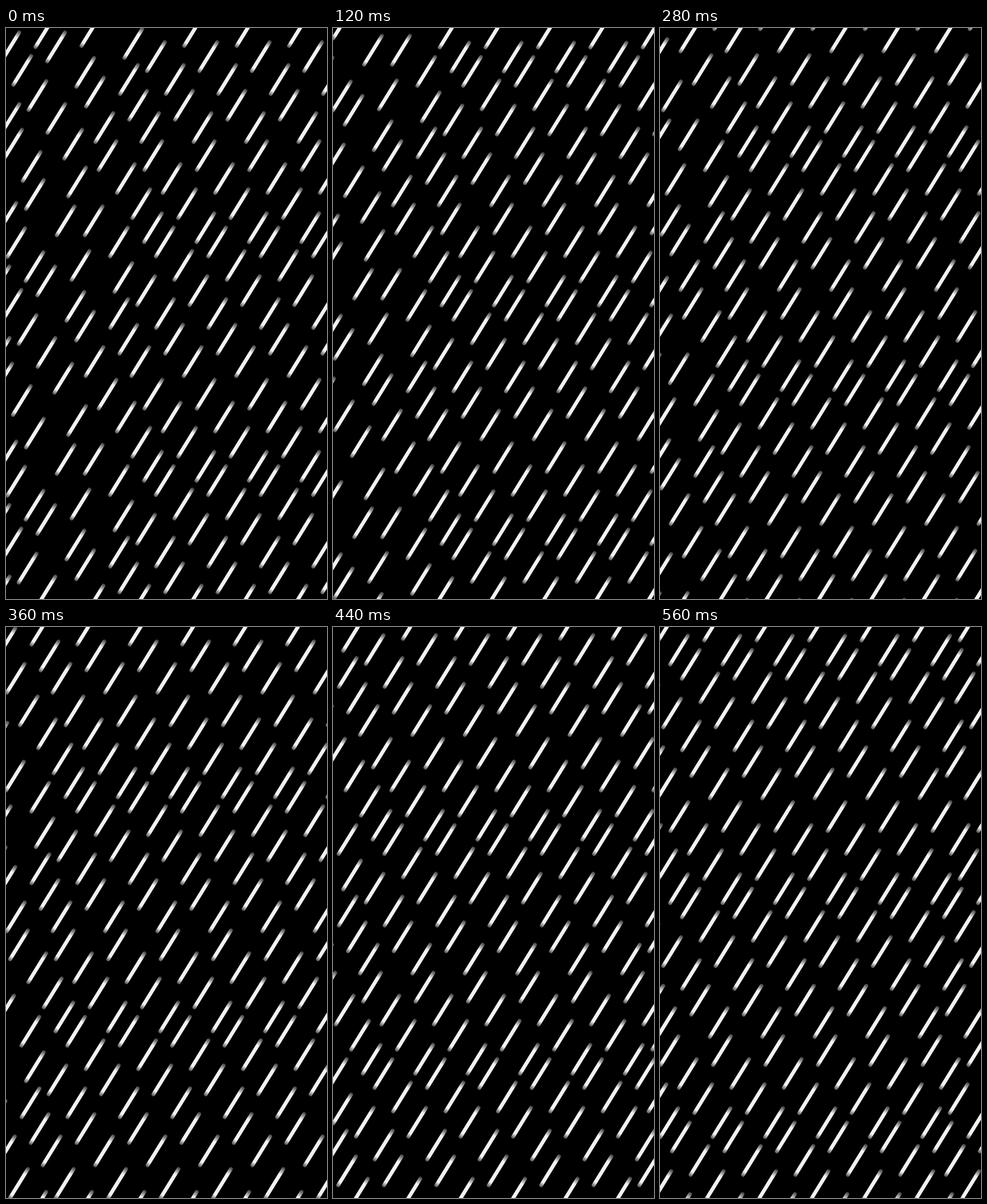
Animation of 561x998 px, one loop 0.6 s. Source, as an HTML page with a canvas:

```html
<!DOCTYPE html>
<html lang="en">
<head>
<meta charset="utf-8">
<title>Rain</title>
<style>
  html, body { margin: 0; width: 100%; height: 100%; overflow: hidden; background: #000; }
  canvas { display: block; }
</style>
</head>
<body>
<canvas id="rain" width="561" height="998"></canvas>
<script>
const canvas = document.getElementById('rain');
const ctx = canvas.getContext('2d');
const W = canvas.width, H = canvas.height;
const STEP = 40, LOOP = 600;
const VX = -17.2, VY = 36.95;

const GAP = 91.6;                       // between columns
const EDGE = 80;                        // tighter gap at both ends of a row
const FIRST = 244, LAST = 768;          // range of the even columns
const BLOCK = { x: -745, y: 68 };       // next block to the left
const UNIT = 417;                       // height of one set of rows
const PAIR = { x: 17.2, y: -826 };      // next pair of units above

// Shift from each row to the next
const shifts = [[32, 40], [27, 44], [32, 42], [20.5, 25], [32.5, 41],
                [26.5, 44], [33, 40], [16, 45], [32.5, 39], [22.5, 57]];
// Loose drops where two blocks meet
const loose = [[143, 46], [123, 114], [172, 114], [149, 192],
               [224, 213], [140, 263.5], [157, 298], [119, 389]];

// Row ends give way to loose drops of their own block or the next one
const crowded = (x, y) => loose.some(([lx, ly]) =>
  Math.hypot(lx - x, ly - y) < 53 ||
  Math.hypot(lx - BLOCK.x - x, ly - BLOCK.y - y) < 53);

function buildUnit() {
  const drops = [...loose];
  const addEnd = (x, y) => { if (!crowded(x, y)) drops.push([x, y]); };
  let x = 276.2, y = 0;
  for (const [dx, dy] of shifts) {
    addEnd(x - EDGE, y);
    let col = x;
    for (; col < LAST; col += GAP) drops.push([col, y]);
    addEnd(col - GAP + EDGE, y);
    x += dx;
    y += dy;
    if (x > FIRST + GAP + 1) x -= GAP;
  }
  return drops;
}

const unit = buildUnit();
const drops = [];
for (let block = 0; block < 2; block++) {
  for (let pair = 0; pair < 2; pair++) {
    for (let row = 0; row < 2; row++) {
      const ox = block * BLOCK.x + pair * PAIR.x;
      const oy = 194 + block * BLOCK.y + pair * PAIR.y + row * UNIT;
      for (const [x, y] of unit) drops.push([x + ox, y + oy]);
    }
  }
}

// A streak hangs down and left from its top right corner, faint at both ends
const fade = ctx.createLinearGradient(-1, 0.5, -36.5, 57.5);
const tone = alpha => `rgba(242,242,242,${alpha})`;
fade.addColorStop(0, tone(0.2));
fade.addColorStop(0.22, tone(1));
fade.addColorStop(0.85, tone(1));
fade.addColorStop(1, tone(0.25));

function draw(step) {
  ctx.setTransform(1, 0, 0, 1, 0, 0);
  ctx.fillStyle = '#000';
  ctx.fillRect(0, 0, W, H);
  ctx.strokeStyle = fade;
  ctx.lineWidth = 6.5;
  ctx.lineCap = 'round';
  for (const [px, py] of drops) {
    const x = px + step * VX, y = py + step * VY;
    if (x < -2 || x > W + 40 || y < -62 || y > H) continue;
    ctx.setTransform(1, 0, 0, 1, x, y);
    ctx.beginPath();
    ctx.moveTo(-3, 3.5);
    ctx.lineTo(-34.5, 54.5);
    ctx.stroke();
  }
}

const start = performance.now();
let shown = -1;
function tick() {
  const step = Math.floor(((performance.now() - start) % LOOP) / STEP);
  if (step !== shown) draw(shown = step);
  requestAnimationFrame(tick);
}
tick();
</script>
</body>
</html>
```
